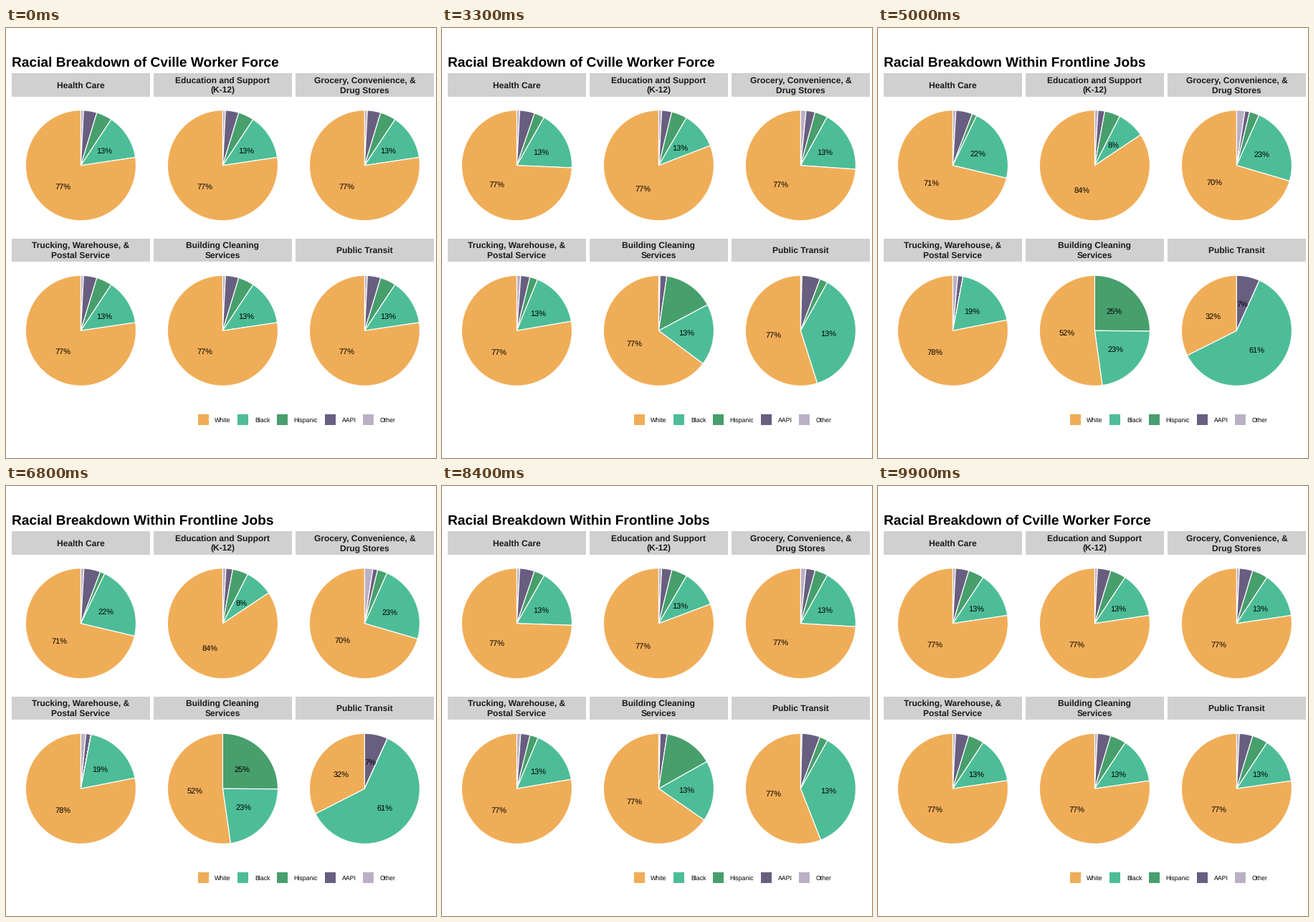
Recreate the animation shown at these times as a matplotlib script. Size 600 by 600 pixels, loop 10 s.

```python
import matplotlib.pyplot as plt
import numpy as np
from matplotlib.animation import FuncAnimation
from matplotlib.patches import Polygon, Rectangle

plt.rcParams["font.family"] = "Liberation Sans"
plt.rcParams["text.hinting"] = "none"

SIZE, DPI = 600, 100
PT = 72 / DPI  # points per pixel
FRAMES, INTERVAL = 100, 100

# Slices run clockwise from twelve o'clock.
GROUPS = ["Other", "AAPI", "Hispanic", "Black", "White"]
COLORS = ["#BBB0C6", "#685F80", "#479F6C", "#4DBD97", "#F0AD57"]
TITLES = ["Racial Breakdown of Cville Worker Force",
          "Racial Breakdown Within Frontline Jobs"]

# Cumulative shares at the slice boundaries.
OVERALL = np.array([0, .008, .047, .093, .2265, 1])
JOBS = {
    "Health Care": [0, .009, .0575, .071, .2870, 1],
    "Education and Support\n(K-12)": [0, .0095, .0293, .075, .1564, 1],
    "Grocery, Convenience, &\nDrug Stores": [0, .024, .038, .0665, .2955, 1],
    "Trucking, Warehouse, &\nPostal Service": [0, .0146, .0297, .0297, .2190, 1],
    "Building Cleaning\nServices": [0, 0, 0, .2515, .4780, 1],
    "Public Transit": [0, 0, .0680, .0680, .6760, 1],
}

PANEL, STRIP, GAP = 192.6, 32.5, 5.4
LEFT, TOP = 8.1, 63
RADIUS = 0.4 * PANEL
MIN_LABELLED = 0.06

fig = plt.figure(figsize=(SIZE / DPI, SIZE / DPI), dpi=DPI, facecolor="white")
ax = fig.add_axes([0, 0, 1, 1])
ax.set(xlim=(0, SIZE), ylim=(SIZE, 0))
ax.axis("off")


def write(x, baseline, text, px, **style):
    return ax.text(x, baseline, text, fontsize=px * PT, va="baseline", **style)


def box(x, y, w, h, color):
    ax.add_patch(Rectangle((x, y), w, h, facecolor=color, linewidth=0))


def polar(center, share, radius):
    angle = 2 * np.pi * np.asarray(share)
    return np.stack([center[0] + radius * np.sin(angle),
                     center[1] - radius * np.cos(angle)], axis=-1)


class Pie:
    def __init__(self, center, shares):
        self.center = center
        self.states = [OVERALL, np.array(shares)]
        self.slices = [ax.add_patch(Polygon([center] * 3, facecolor=color, edgecolor="white",
                                            linewidth=1.2 * PT, joinstyle="miter"))
                       for color in COLORS]
        self.labels = [write(*center, "", 11, ha="center", color="black", zorder=3)
                       for _ in COLORS]

    def update(self, mix):
        start, end = self.states
        bounds = start + (end - start) * mix
        shown = np.diff(end if mix > 0.501 else start)
        for i, (a, b) in enumerate(zip(bounds, bounds[1:])):
            arc = polar(self.center, np.linspace(a, b, 2 + int(180 * (b - a))), RADIUS)
            self.slices[i].set_xy(np.vstack([self.center, arc]))
            x, y = polar(self.center, (a + b) / 2, RADIUS / 2)
            self.labels[i].set_position((x, y + 3.95))
            self.labels[i].set_text(f"{shown[i]:.0%}" if shown[i] >= MIN_LABELLED else "")


def make_panel(index, name, shares):
    row, col = divmod(index, 3)
    x = LEFT + col * (PANEL + GAP)
    y = TOP + row * (STRIP + PANEL + GAP)
    box(x, y, PANEL, STRIP, "#D0D0D0")
    lines = name.split("\n")
    for i, line in enumerate(lines):
        baseline = y + STRIP / 2 + 4.4 + 13 * (i - (len(lines) - 1) / 2)
        write(x + PANEL / 2, baseline, line, 12, weight="bold", ha="center", color="#1A1A1A")
    return Pie((x + PANEL / 2, y + STRIP + PANEL / 2), shares)


def make_legend():
    lefts = [267.5, 323, 377.8, 444.7, 497.9]
    for x, name, color in zip(lefts, GROUPS[::-1], COLORS[::-1]):
        box(x, 539, 15.2, 15.2, color)
        write(x + 23.8, 550.2, name, 8.8, color="black")


title = write(LEFT, 54, TITLES[0], 19.2, weight="bold", color="black")
pies = [make_panel(i, name, shares) for i, (name, shares) in enumerate(JOBS.items())]
make_legend()


def update(frame):
    progress = np.interp(frame, [16, 50, 67, 100], [0, 1, 1, 0])
    mix = (1 - np.cos(np.pi * progress)) / 2
    for pie in pies:
        pie.update(mix)
    title.set_text(TITLES[34 <= frame <= 84])
    return []


anim = FuncAnimation(fig, update, frames=FRAMES, interval=INTERVAL,
                     repeat=True, repeat_delay=0, blit=False)
plt.show()
```
